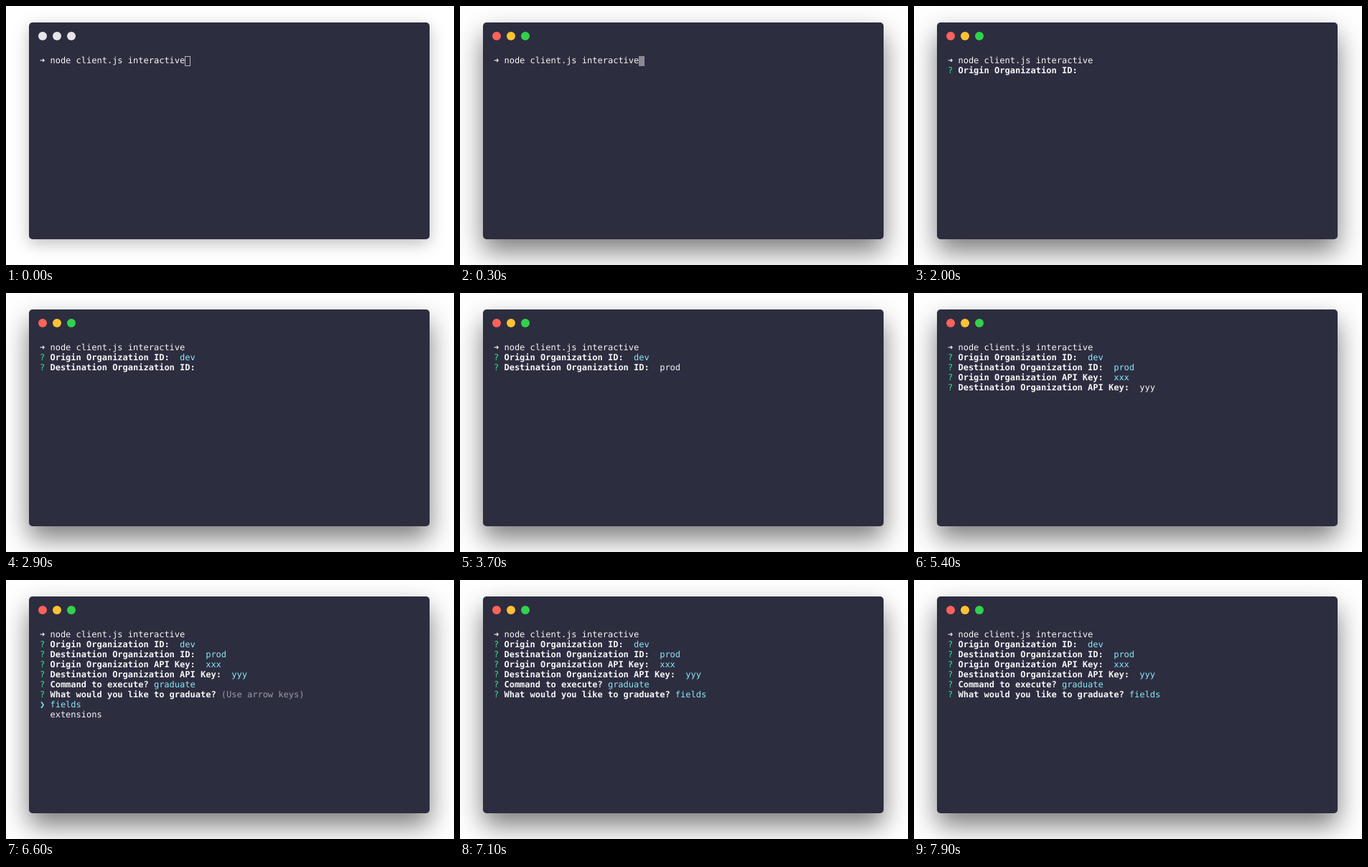
Recreate the animation shown at these times as an HTML page. Size 624 by 362 pixels, loop 8000 ms.

```html
<!DOCTYPE html>
<html lang="en">
<head>
<meta charset="utf-8">
<title>Terminal prompt</title>
<style>
  html, body { margin: 0; width: 100%; height: 100%; overflow: hidden; background: #fff; }
  #stage { position: relative; width: 624px; height: 362px; overflow: hidden; }
  #window {
    position: absolute; left: 32px; top: 23px; width: 558px; height: 303px;
    border-radius: 5px; background: #2d2d40;
    box-shadow: 0 6px 22px rgba(0, 0, 0, .26);
  }
  #window.active { box-shadow: 0 17px 36px rgba(0, 0, 0, .52); }
  svg { position: absolute; left: 0; top: 0; display: block; }
  text {
    font: 12px "DejaVu Sans Mono", monospace;
    text-rendering: geometricPrecision; white-space: pre; fill: #f6f6f6;
  }
  .bold { font-weight: bold; }
  .green { fill: #31e78b; }
  .cyan { fill: #86e9f6; }
  .dim { fill: #9b9ba3; }
</style>
</head>
<body>
<div id="stage">
  <div id="window"></div>
  <svg width="624" height="362" viewBox="0 0 624 362">
    <g id="lights"></g>
    <rect id="cursor"></rect>
    <g id="screen"></g>
  </svg>
</div>
<script>
const LOOP = 8000, LEFT = 47, TOP = 70, COL = 7.224, ROW = 14;
const FOCUS = 100, RUN = 500, BLINK = 1000, READY = 2000;
const LIGHTS = ['#ff6259', '#ffc231', '#31d24c'];

// Typed prompts: keys start at `type`, Enter is pressed at `done`.
// List prompts: `down` is when the selection moves to the second option.
const PROMPTS = [
  { ask: 'Origin Organization ID:', answer: 'dev', type: 2600, done: 2900 },
  { ask: 'Destination Organization ID:', answer: 'prod', type: 3400, done: 3900 },
  { ask: 'Origin Organization API Key:', answer: 'xxx', type: 4400, done: 4800 },
  { ask: 'Destination Organization API Key:', answer: 'yyy', type: 5200, done: 5500 },
  { ask: 'Command to execute?', answer: 'graduate', list: ['diff', 'graduate'], down: 5900, done: 6200 },
  { ask: 'What would you like to graduate?', answer: 'fields', list: ['fields', 'extensions'], down: Infinity, done: 6800 }
];

const $ = id => document.getElementById(id);

function add(parent, tag, attrs) {
  const el = document.createElementNS('http://www.w3.org/2000/svg', tag);
  for (const key in attrs) el.setAttribute(key, attrs[key]);
  return parent.appendChild(el);
}

function put(row, col, str, cls = '') {
  add($('screen'), 'text', { x: LEFT + col * COL, y: TOP + 10 + row * ROW, class: cls }).textContent = str;
}

const lights = LIGHTS.map((_, i) => add($('lights'), 'circle', { cx: 51 + i * 20, cy: 42, r: 6 }));

function drawPrompt(p, row, t) {
  const done = t >= p.done;
  const col = 2 + p.ask.length + (p.list ? 1 : 2);
  put(row, 0, '?', 'green');
  put(row, 2, p.ask, 'bold');
  if (done) return put(row, col, p.answer, 'cyan');
  if (!p.list) {
    const count = Math.max(0, Math.floor((t - p.type) / 100) + 1);
    return put(row, col, p.answer.slice(0, count));
  }
  const moved = t >= p.down;
  if (!moved) put(row, col, '(Use arrow keys)', 'dim');
  p.list.forEach((item, i) => {
    const picked = i === Number(moved);
    if (picked) put(row + 1 + i, 0, '❯', 'cyan');
    put(row + 1 + i, 2, item, picked ? 'cyan' : '');
  });
}

function drawScreen(t) {
  $('screen').replaceChildren();
  put(0, 0, '➜');
  put(0, 2, 'node client.js interactive');
  let start = READY;
  PROMPTS.forEach((p, i) => {
    if (t >= start) drawPrompt(p, i + 1, t);
    start = p.done;
  });
}

function drawCursor(t, active) {
  const waiting = t >= RUN;
  const inset = active ? 0 : 0.5;
  const attrs = {
    x: (waiting ? LEFT : 249) + inset,
    y: TOP + (waiting ? ROW : 0) + inset,
    width: 8 - 2 * inset,
    height: ROW - 2 * inset,
    fill: active ? '#8b8a94' : 'none',
    stroke: active ? 'none' : '#b4b4bc',
    visibility: t < BLINK ? 'visible' : 'hidden'
  };
  for (const key in attrs) $('cursor').setAttribute(key, attrs[key]);
}

let last = -1;
function render(t) {
  const step = Math.floor(t / 100);
  if (step === last) return;
  last = step;
  const now = step * 100, active = now >= FOCUS;
  $('window').classList.toggle('active', active);
  lights.forEach((el, i) => el.setAttribute('fill', active ? LIGHTS[i] : '#e6e6e8'));
  drawCursor(now, active);
  drawScreen(now);
}

const begin = performance.now();
function tick() {
  render((performance.now() - begin) % LOOP);
  requestAnimationFrame(tick);
}
tick();
</script>
</body>
</html>
```
